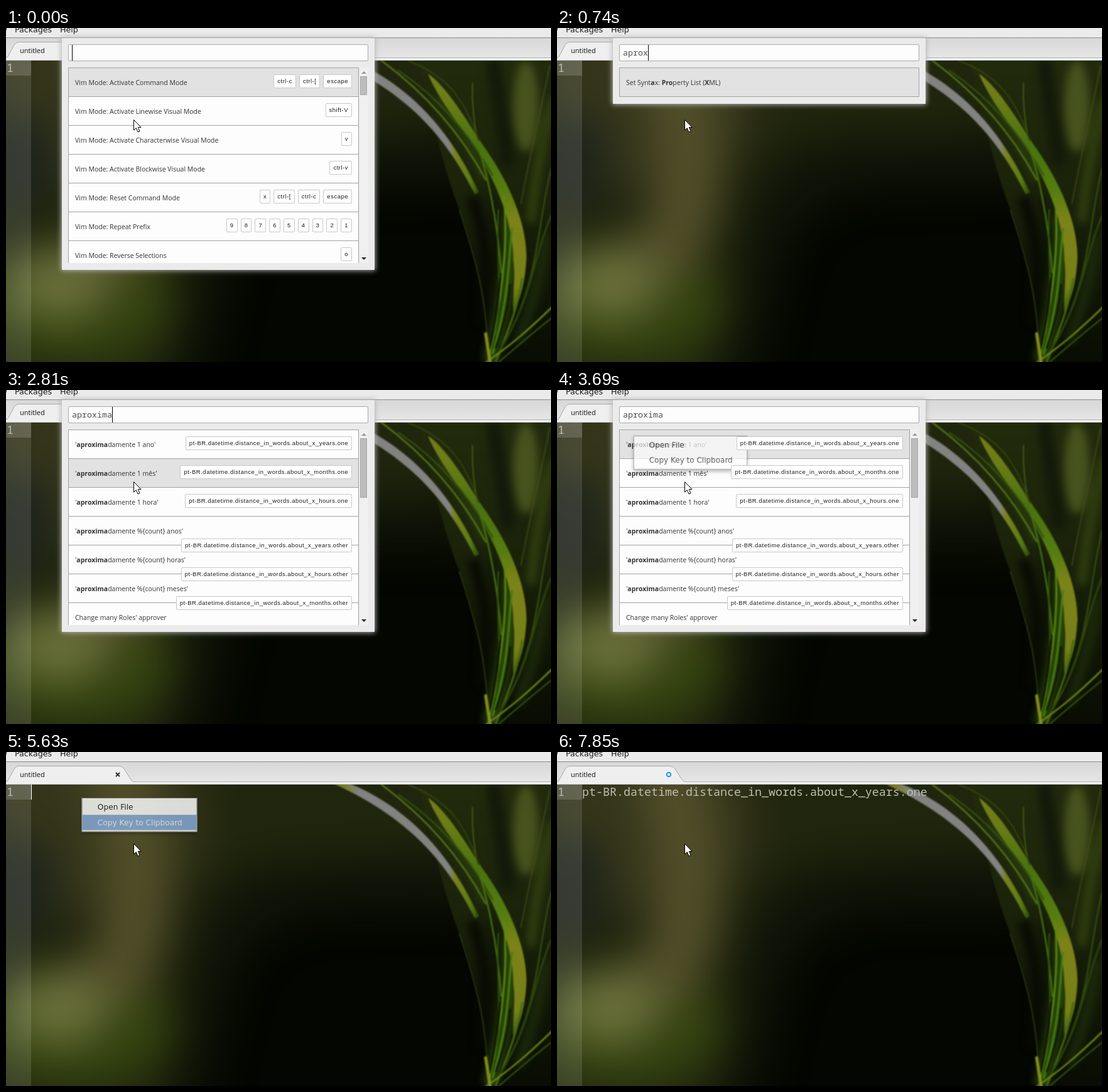
These frames come from a looping animation (868 by 533 pixels, 8000 ms). An HTML page:

```html
<!DOCTYPE html>
<html lang="en">
<head>
<meta charset="utf-8">
<title>Command palette</title>
<style>
html, body { margin: 0; width: 100%; height: 100%; overflow: hidden; background: #040601; }
#stage { position: relative; width: 868px; height: 533px; overflow: hidden; font: 10.5px "Open Sans", sans-serif; color: #333; }
#stage div, #stage svg, .badges { position: absolute; box-sizing: border-box; white-space: pre; }
.mono { font-family: "Noto Sans Mono", monospace; }
filter { color-interpolation-filters: sRGB; }

#gutter { left: 0; top: 52px; width: 40px; height: 481px; background: rgba(255,255,255,.11); }
#lineNo { left: 0; top: 52px; width: 40px; height: 24px; padding-left: 1px; background: rgba(255,255,255,.15); }
.code { font-size: 18.33px; line-height: 22px; color: #bcbeb2; }
#line { left: 40px; top: 52px; }
#editCaret { top: 52px; width: 1px; height: 24px; background: #fff; }

#menubar { left: 0; top: 0; width: 868px; height: 16px; background: #ebebeb; border-bottom: 1px solid #8c8c8c; font: 12.7px/16px "DejaVu Sans", sans-serif; color: #1c1c1c; }
#menubar div { top: -5px; }
#tabs { left: 0; top: 16px; }

#panel { left: 89px; top: 16px; width: 498px; background: #ebebeb; box-shadow: 0 0 8px 1px #b4b4b4; }
#input { left: 10px; top: 10px; width: 478px; height: 27px; padding-left: 5px; border: 1px solid #aaa; border-radius: 2px; background: #fdfdfd; font-size: 13.33px; line-height: 24px; color: #505050; }
#caret { top: 11px; width: 1px; height: 25px; background: #000; }
#list { left: 10px; top: 47px; overflow: hidden; border-top: 1px solid #a3a3a3; }
#list .row { position: relative; height: 46px; padding-left: 10px; border: solid #a3a3a3; border-width: 0 1px 1px; background: #fdfdfd; line-height: 46px; }
#list .picked { background: #e2e2e2; }
.badges { right: 10px; top: 10px; z-index: 1; display: flex; gap: 5px; }
.badges.low { top: 35px; }
.badges i { box-sizing: border-box; height: 22px; padding: 0 5px; border: 1px solid #c8c8c8; border-radius: 2px; background: #fff; font: 9.5px/20px "Liberation Sans", Arial, sans-serif; letter-spacing: .5px; color: #1e1e1e; }
#bar { left: 474px; top: 47px; width: 14px; height: 312px; background: #f0f0f0; }
#thumb { left: 1px; top: 14px; width: 11px; background: #bcbcbc; border: 1px solid #a6a6a6; }
#bar svg { left: 0; top: 0; }

#popup { left: 118px; top: 73px; width: 189px; height: 56px; padding: 2px 0; border: 1px solid #808080; background: #fdfdfd; box-shadow: 0 3px 6px rgba(0,0,0,.4); transform-origin: 50% 0; font: 12.5px/25px "DejaVu Sans", sans-serif; color: #222; }
#popup .item { position: relative; height: 25px; padding-left: 25px; }
#popup .hot { background: #86abd9; color: #f0f5fa; }
</style>
</head>
<body>
<div id="stage">
  <svg width="868" height="533" fill="none">
    <defs>
      <filter id="haze" filterUnits="userSpaceOnUse" x="-250" y="-250" width="1400" height="1100"><feGaussianBlur stdDeviation="32"/></filter>
      <filter id="soft" filterUnits="userSpaceOnUse" x="400" y="-50" width="560" height="680"><feGaussianBlur stdDeviation="7"/></filter>
      <filter id="fine" filterUnits="userSpaceOnUse" x="400" y="-50" width="560" height="680"><feGaussianBlur stdDeviation=".8"/></filter>
      <linearGradient id="arc" gradientUnits="userSpaceOnUse" x1="520" y1="0" x2="755" y2="0">
        <stop offset=".06" stop-color="#767c18"/><stop offset=".18" stop-color="#828380"/><stop offset=".79" stop-color="#828380"/>
        <stop offset=".83" stop-color="#77801f"/><stop offset=".93" stop-color="#5d7c14"/><stop offset="1" stop-color="#2c4a0a"/>
      </linearGradient>
      <linearGradient id="leaf" gradientUnits="userSpaceOnUse" x1="0" y1="70" x2="0" y2="460">
        <stop offset="0" stop-color="#767f17"/><stop offset=".12" stop-color="#6b7d16"/><stop offset=".3" stop-color="#4a720f"/>
        <stop offset=".48" stop-color="#547c10"/><stop offset=".6" stop-color="#7c8218"/><stop offset=".88" stop-color="#768018"/><stop offset="1" stop-color="#3a5a0c"/>
      </linearGradient>
      <linearGradient id="veil" x2="0" y2="1">
        <stop offset="0" stop-color="#232b0d"/><stop offset=".45" stop-color="#1a220a"/><stop offset="1" stop-color="#080c03"/>
      </linearGradient>
    </defs>
    <rect width="868" height="533" fill="#040601"/>
    <g filter="url(#haze)">
      <path d="M-100 -100H760V250C600 260 480 235 410 290S350 470 290 640H-100Z" fill="#10140700" stroke="none"/>
      <path d="M-100 -100H760V250C600 260 480 235 410 290S350 470 290 640H-100Z" fill="#101407"/>
      <path d="M-100 -100H740V150C580 190 420 140 340 220S310 400 220 640H-100Z" fill="#20250d"/>
      <ellipse cx="150" cy="110" rx="170" ry="150" fill="#34351a"/>
      <ellipse cx="110" cy="440" rx="160" ry="95" fill="#33420f"/>
      <path d="M170 10C210 130 222 250 195 315S130 380 80 410" stroke="#514e29" stroke-width="105"/>
      <ellipse cx="15" cy="215" rx="62" ry="85" fill="#1c221b"/>
      <ellipse cx="85" cy="408" rx="78" ry="60" fill="#686e39"/>
    </g>
    <g filter="url(#fine)">
      <path d="M655 45C676 130 695 220 722 290S768 440 768 540H875V45Z" fill="url(#veil)"/>
      <path d="M549 51C625 83 700 145 753 262L747 266C700 172 640 105 523 51Z" fill="url(#arc)"/>
    </g>
    <g filter="url(#soft)">
      <ellipse cx="828" cy="125" rx="20" ry="72" fill="#47531d"/>
      <path d="M872 110C852 190 842 240 836 310" stroke="#34430f" stroke-width="13"/>
      <path d="M776 50C785 130 795 170 800 220" stroke="#12190a" stroke-width="22"/>
      <path d="M742 270Q775 350 758 470" stroke="#070a03" stroke-width="18"/>
      <path d="M802 300C808 370 796 440 770 533" stroke="#2d4a0b" stroke-width="20"/>
      <path d="M690 110Q735 165 765 240" stroke="#2a3d0c" stroke-width="15"/>
      <path d="M858 330Q850 420 815 500" stroke="#1d2b0b" stroke-width="15"/>
      <path d="M772 270Q785 320 780 400" stroke="#0a1004" stroke-width="8"/>
    </g>
    <g filter="url(#fine)" stroke-linecap="round">
      <path d="M672 73C700 92 728 138 759 186C800 243 829 310 829 366C827 405 820 430 808 456C806 425 812 400 808 370C808 312 782 252 755 204C732 166 690 118 672 73Z" fill="url(#leaf)"/>
      <path d="M598 52C660 98 720 160 764 242" stroke="#557518" stroke-width="2.500"/>
      <path d="M625 68C690 112 735 165 775 235" stroke="#33500f" stroke-width="2.500"/>
      <path d="M743 88Q741 130 751 178" stroke="#4e681c" stroke-width="1.500"/>
      <path d="M640 52C700 75 730 110 753 180" stroke="#34460f" stroke-width="2"/>
      <path d="M750 185C765 225 782 300 789 390" stroke="#47720f" stroke-width="2.500"/>
      <path d="M793 270C800 340 792 420 768 530" stroke="#568a0d" stroke-width="3"/>
      <path d="M806 320C799 380 802 430 775 520" stroke="#47800c" stroke-width="3"/>
      <path d="M784 290C780 360 792 410 779 490" stroke="#34590c" stroke-width="2"/>
      <path d="M822 400C815 450 796 490 780 533" stroke="#47690f" stroke-width="3"/>
      <path d="M787 400C784 440 776 490 768 520" stroke="#0c1204" stroke-width="3"/>
      <path d="M803 410C800 450 790 480 780 510" stroke="#0f1805" stroke-width="3"/>
      <path d="M868 225C845 320 850 400 795 500" stroke="#3a5411" stroke-width="2"/>
      <path d="M866 60C848 150 835 200 820 280" stroke="#414f1a" stroke-width="1.500"/>
      <path d="M868 300C838 370 838 440 776 530" stroke="#2b430d" stroke-width="3"/>
      <path d="M870 445C832 482 803 507 765 533" stroke="#6f8a15" stroke-width="2.500"/>
      <path d="M870 462C834 490 806 515 785 533" stroke="#395a0e" stroke-width="2"/>
      <path d="M722 290C755 390 766 440 768 533" stroke="#3c521b" stroke-width="1.200"/>
      <path d="M764 488L771 533" stroke="#838d1e" stroke-width="5"/>
    </g>
  </svg>

  <div id="gutter"></div>
  <div id="lineNo" class="code mono">1</div>
  <div id="line" class="code mono"></div>
  <div id="editCaret"></div>

  <svg id="tabs" width="868" height="36" fill="none">
    <defs><linearGradient id="strip" x2="0" y2="1"><stop offset="0" stop-color="#d7d7d7"/><stop offset="1" stop-color="#e8e8e8"/></linearGradient></defs>
    <rect width="868" height="36" fill="url(#strip)"/>
    <path d="M0 31.500H868" stroke="#b2b2b2"/>
    <rect y="32" width="868" height="4" fill="#f0f0f0"/>
    <path d="M0 32Q3 31 5 26L13 11Q16 6.500 20 6.500H180Q185 6.500 188 11L199 28Q201 31.500 204 32Z" fill="#efefef"/>
    <path d="M0 31Q3 31 5 26L13 11Q16 6.500 20 6.500H180Q185 6.500 188 11L199 28Q201 31.500 204 31.500" stroke="#a8a8a8"/>
    <path d="M0 35.500H868" stroke="#c4c4c4"/>
    <path id="close" d="M175 17L181 23M181 17L175 23" stroke="#333" stroke-width="2.200"/>
    <circle id="dirty" cx="178" cy="20" r="3.200" stroke="#1c98f2" stroke-width="2"/>
  </svg>
  <div style="left:22px;top:28px;font-size:11px;line-height:16px;color:#111">untitled</div>
  <div id="menubar"><div style="right:866px">View</div><div style="left:14px">Packages</div><div style="left:86px">Help</div></div>

  <div id="panel">
    <div id="input" class="mono"></div>
    <div id="caret"></div>
    <div id="list"></div>
    <div id="bar">
      <svg width="14" height="312"><path d="M3 10H11L7 6Z" fill="#999"/><path d="M3 303H11L7 307Z" fill="#222"/></svg>
      <div id="thumb"></div>
    </div>
  </div>

  <div id="popup"><div class="item">Open File</div><div class="item">Copy Key to Clipboard</div></div>

  <svg width="868" height="533"><path d="M203.500 146.500V163L207.300 159.500L210 166L213 164.800L210.300 158.500H215Z" fill="#fff" stroke="#000"/></svg>
</div>

<script>
const $ = id => document.getElementById(id);
const LOOP = 8000;
const QUERY = 'aproxima';
const PREFIX = 'pt-BR.datetime.distance_in_words.about_x_';

const keyTimes = [140, 290, 440, 590, 740, 890, 1030, 1180];
const blinkTimes = [1620, 2070, 2360, 2810, 3250, 5630, 6060, 6360, 6810, 7260, 7850];
// start, scale, opacity
const popupSteps = [[0, 1, 0], [3690, .96, .7], [3840, 1, 1], [5630, .973, .83], [5770, .955, .4], [5920, 1, 0]];

const commands = [
  ['Vim Mode: Activate Command Mode', 'ctrl-c ctrl-[ escape'],
  ['Vim Mode: Activate Linewise Visual Mode', 'shift-V'],
  ['Vim Mode: Activate Characterwise Visual Mode', 'v'],
  ['Vim Mode: Activate Blockwise Visual Mode', 'ctrl-v'],
  ['Vim Mode: Reset Command Mode', 'x ctrl-[ ctrl-c escape'],
  ['Vim Mode: Repeat Prefix', '9 8 7 6 5 4 3 2 1'],
  ['Vim Mode: Reverse Selections', 'o'],
  ['Application: Add Project Folder', 'ctrl-shift-O'],
  ['Application: Report Issue'],
  ['Application: Reload Window'],
  ['Application: Open Your Config'],
  ['Application: Bring All Windows To Front'],
  ['Autocomplete Plus: Toggle Provider'],
  ['Set Syntax: Property List (XML)']
];
const phrase = (text, unit, low) =>
  [`'aproximadamente ${text}'`, PREFIX + unit + (low ? '.other' : '.one'), low];
const phrases = [
  phrase('1 ano', 'years'),
  phrase('1 mês', 'months'),
  phrase('1 hora', 'hours'),
  phrase('%{count} anos', 'years', true),
  phrase('%{count} horas', 'hours', true),
  phrase('%{count} meses', 'months', true),
  ["Change many Roles' approver"]
];

const passed = (times, t) => times.filter(x => x <= t).length;

// Bold the letters of the query in order; null when some are missing
function fuzzy(text, query) {
  let i = 0;
  const html = [...text].map(c =>
    i < query.length && c.toLowerCase() === query[i] ? (i++, `<b>${c}</b>`) : c).join('');
  return i === query.length ? html : null;
}

function rowHtml([text, keys, low], query, picked) {
  const badges = keys ? keys.split(' ').map(k => `<i>${k}</i>`).join('') : '';
  return `<div class="row${picked ? ' picked' : ''}">${fuzzy(text, query) || text}` +
    `<span class="badges${low ? ' low' : ''}">${badges}</span></div>`;
}

function drawList(typed, picked) {
  const query = QUERY.slice(0, typed);
  const rows = typed > 5 ? phrases : commands.filter(c => fuzzy(c[0], query)).slice(0, 7);
  const scrolls = rows.length > 6;
  const height = Math.min(rows.length * 46 + 1, 312);
  $('input').textContent = query;
  $('caret').style.left = 16 + typed * 8 + 'px';
  $('list').innerHTML = rows.map((r, i) => rowHtml(r, query, i === picked)).join('');
  $('list').style.height = height + 'px';
  $('list').style.width = (scrolls ? 463 : 478) + 'px';
  $('panel').style.height = height + 58 + 'px';
  $('bar').style.display = scrolls ? '' : 'none';
  $('thumb').style.height = (typed > 5 ? 95 : 30) + 'px';
}

const show = (id, on) => { $(id).style.visibility = on ? 'visible' : 'hidden'; };

let drawn = '';
function render(t) {
  const typed = passed(keyTimes, t);
  const picked = t >= 2660 && t < 2950 ? 1 : 0;
  const open = t < 5630;
  const lit = passed(blinkTimes, t) % 2 === 0;
  const pasted = t >= 7400;

  if (drawn !== typed + ':' + picked) {
    drawn = typed + ':' + picked;
    drawList(typed, picked);
  }
  $('panel').style.display = open ? '' : 'none';
  show('caret', open && lit);
  show('editCaret', !open && lit);

  const [, scale, alpha] = popupSteps[passed(popupSteps.map(s => s[0]), t) - 1];
  $('popup').style.transform = scale === 1 ? 'none' : `scale(${scale})`;
  $('popup').style.opacity = alpha;
  const hot = t < 4140 ? -1 : t < 4580 ? 0 : 1;
  [...$('popup').children].forEach((el, i) => el.classList.toggle('hot', i === hot));

  $('line').textContent = pasted ? PREFIX + 'years.one' : '';
  $('editCaret').style.left = (pasted ? 590 : 40) + 'px';
  show('close', t < 7700);
  show('dirty', t >= 7700);
}

const start = performance.now();
function tick() {
  render((performance.now() - start) % LOOP);
  requestAnimationFrame(tick);
}
tick();
</script>
</body>
</html>
```
